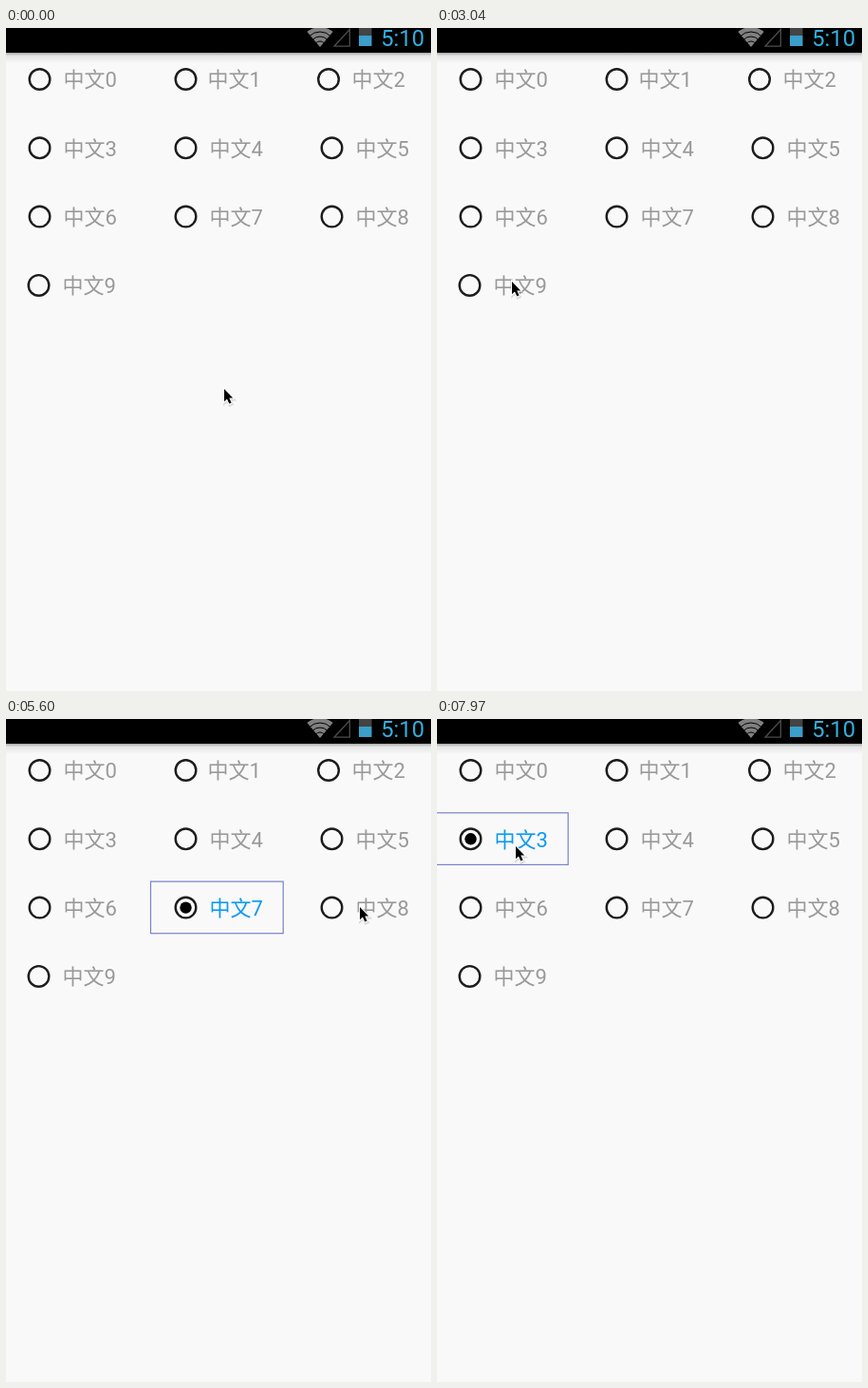
Recreate the animation shown at these times as an HTML page. Size 448 by 698 pixels, loop 8000 ms.

```html
<!DOCTYPE html>
<html lang="zh">
<head>
<meta charset="utf-8">
<title>Radio grid</title>
<style>
  html, body { margin: 0; width: 100%; height: 100%; overflow: hidden; background: #f9f9f9; }
  svg { display: block; width: 448px; height: 698px; }
  text { font-family: Roboto, "Noto Sans CJK SC", "Noto Sans CJK", sans-serif; }
  .label { font-size: 22px; fill: #999; }
  .ring { fill: none; stroke: #1c1c1c; stroke-width: 2.4; }
  .dot, .frame { visibility: hidden; }
  .frame { fill: none; stroke: #7882cb; stroke-width: 1.2; }
  .on .label { fill: #0a9af2; }
  .on .dot, .on .frame { visibility: visible; }
</style>
</head>
<body>
<svg viewBox="0 0 448 698">
  <defs>
    <linearGradient id="shade" x2="0" y2="1">
      <stop offset="0" stop-color="#a8a8a8"/>
      <stop offset=".3" stop-color="#e6e6e6"/>
      <stop offset="1" stop-color="#f9f9f9"/>
    </linearGradient>
    <clipPath id="fan"><path d="M331 20L314 0H348Z"/></clipPath>
    <path id="arrow" d="M0 0V13.2L3 10.4L5.3 15.6L7.6 14.6L5.3 9.6H9.2Z"/>
  </defs>
  <rect width="448" height="698" fill="#f9f9f9"/>
  <rect y="26" width="448" height="11" fill="url(#shade)"/>
  <rect width="448" height="26"/>
  <g clip-path="url(#fan)" stroke="#000">
    <circle cx="331" cy="20" r="21.5" fill="#808080"/>
    <g fill="none">
      <circle cx="331" cy="20" r="6"/>
      <circle cx="331" cy="20" r="11"/>
      <circle cx="331" cy="20" r="16"/>
    </g>
  </g>
  <path d="M346 19.2H362.3V1.5Z" fill="none" stroke="#4c4c4c" stroke-width="1.3"/>
  <rect x="372" width="13.5" height="8" fill="#444"/>
  <rect x="372" y="8" width="13.5" height="11" fill="#3a9fca"/>
  <text x="395.3" y="18.6" font-size="23.7" fill="#33b0e0">5:10</text>
  <g id="grid"></g>
  <g id="cursor">
    <use href="#arrow" x=".6" y="1.4" fill="none" stroke="#000" stroke-opacity=".12" stroke-width="3"/>
    <use href="#arrow" stroke="#fff" stroke-width="2" paint-order="stroke"/>
  </g>
</svg>
<script>
const LOOP = 8000, STEP = 65;
const CELL = 154, ROW = 72.3;

// Cursor stops; a click selects the item under the stop, bow bends the path vertically.
const stops = [
  { from: 0, to: 1, x: 230, y: 380 },
  { from: 1200, to: 1400, x: 223, y: 370 },
  { from: 1880, to: 2180, x: 184, y: 305 },
  { from: 2360, to: 3100, x: 77, y: 268, click: 3280, bow: -34 },
  { from: 3450, to: 3680, x: 98, y: 205, click: 4030 },
  { from: 4210, to: 4600, x: 206, y: 206, click: 4900 },
  { from: 4900, to: 5600, x: 373, y: 198, click: 5720, bow: 8 },
  { from: 5720, to: 6520, x: 386, y: 139, click: 6700 },
  { from: 6700, to: 7040, x: 217, y: 138, click: 7280 },
  { from: 7280, to: 7880, x: 83, y: 134, click: 7970 }
];

// Shifts of ring and label where the layout leaves the regular grid.
const shifts = { 1: [0, -2], 2: [-3.5, -4], 9: [-1, -1] };

const grid = document.getElementById("grid");
const cursor = document.getElementById("cursor");

function itemMarkup(i) {
  const left = i % 3 * CELL, row = Math.floor(i / 3);
  const [ringShift, labelShift] = shifts[i] || [0, 0];
  const cx = left + 35.5 + ringShift, cy = 54 + row * ROW;
  return `<g>
    <rect class="frame" x="${left - 1.5}" y="${cy - 27.5}" width="139.7" height="54.6"/>
    <circle class="ring" cx="${cx}" cy="${cy}" r="10.8"/>
    <circle class="dot" cx="${cx}" cy="${cy}" r="6.2"/>
    <text class="label" x="${left + 60.4 + labelShift}" y="${cy + 8.3}">中文${i}</text>
  </g>`;
}

grid.innerHTML = Array.from({ length: 10 }, (_, i) => itemMarkup(i)).join("");
const items = [...grid.children];

const itemAt = ({ x, y }) => 3 * Math.round((y - 54) / ROW) + Math.floor(x / CELL);
const smooth = u => u * u * (3 - 2 * u);

function cursorAt(t) {
  const k = stops.findLastIndex(s => s.from <= t);
  const { from, to, x, y, bow = 0 } = stops[k];
  const start = stops[Math.max(k - 1, 0)];
  const count = Math.round((to - from) / STEP);
  const progress = Math.min((t - from) / (to - from), 1);
  const u = smooth((Math.floor(progress * count) + 1) / (count + 1));
  return [
    Math.round(start.x + (x - start.x) * u),
    Math.round(start.y + (y - start.y) * u + bow * Math.sin(Math.PI * u))
  ];
}

function draw(t) {
  const clicked = stops.findLast(s => s.click <= t);
  const selected = clicked ? itemAt(clicked) : -1;
  items.forEach((el, i) => el.classList.toggle("on", i === selected));
  cursor.setAttribute("transform", `translate(${cursorAt(t)})`);
}

const origin = performance.now();
function tick() {
  draw((performance.now() - origin) % LOOP);
  requestAnimationFrame(tick);
}
tick();
</script>
</body>
</html>
```
